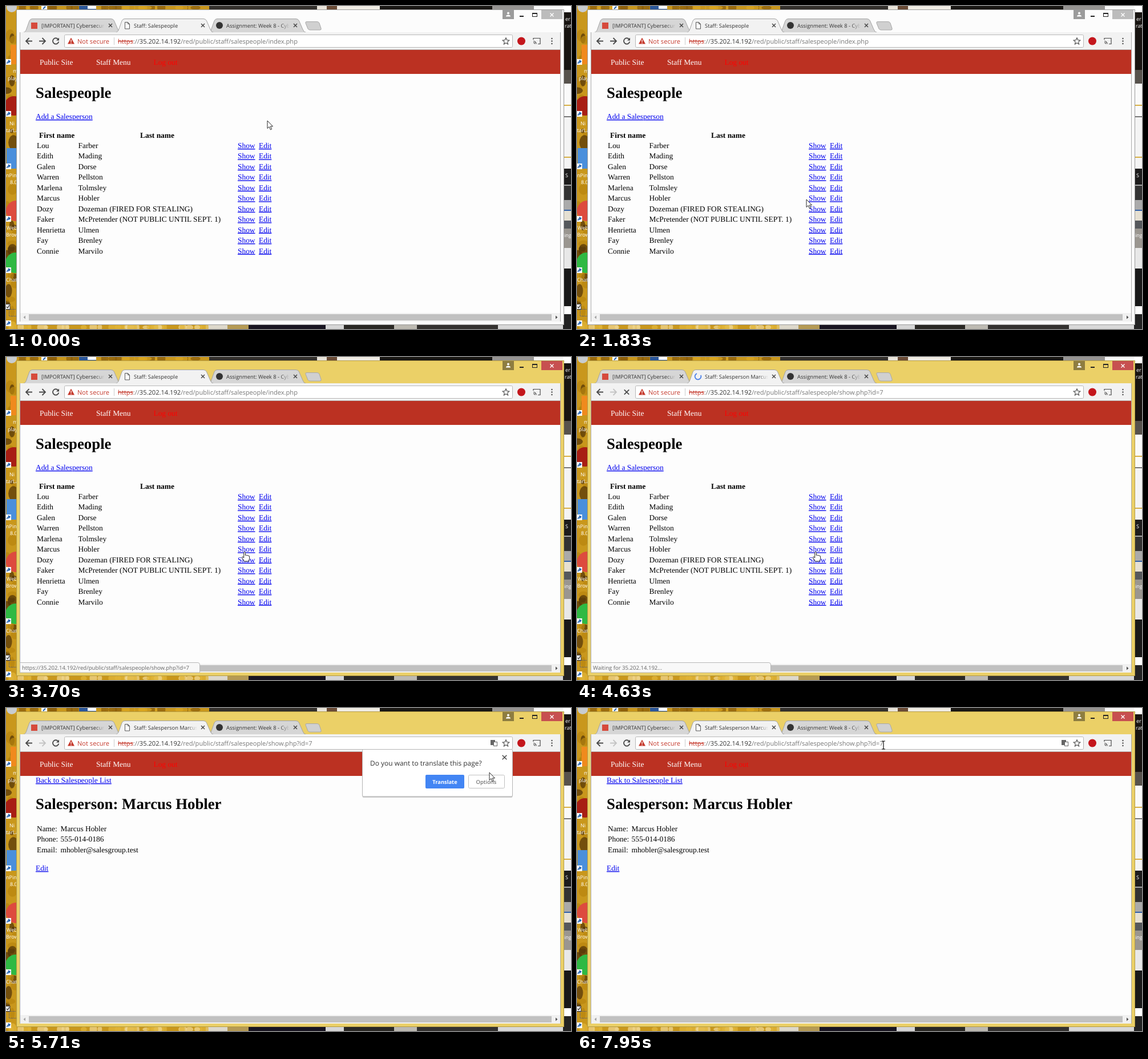
Animation of 990 by 566 pixels, one loop 8000 ms. Source, as an HTML page:

```html
<!DOCTYPE html>
<html lang="en">
<head>
<meta charset="utf-8">
<title>Staff: Salespeople</title>
<style>
html, body { margin: 0; width: 100%; height: 100%; overflow: hidden; background: #c9971c; }
svg {
  display: block; width: 990px; height: 566px; font-family: "Open Sans", sans-serif;
  text-rendering: geometricPrecision;
  --frame: #fcfcfc; --edge: #9a9a9a; --user: #9b9b9b; --close: #bcbcbc;
  background:
    linear-gradient(#fff 0 11px, #181411 0 112px, #57524c 0 136px, #fafafa 0 173px, #d8b045 0 175px,
      #fafafa 0 193px, #777 0 195px, #f4f4f4 0 264px, #d8b045 0 266px, #f4f4f4 0 285px, #1d1c1c 0 313px,
      #a8a8a8 0 315px, #333 0 340px, #aaa 0 357px, #2f5fa8 0 359px, #e6e0d2 0 376px, #55585c 0 390px,
      #9a9690 0 424px, #e8e8e8 0 460px, #191919 0 526px, #fff 0 540px, #222 0) 976px 0 / 14px 566px no-repeat,
    linear-gradient(90deg, #0000 350px, #ddd8cb 0 388px, #b59a55 0 425px, #191521 0 560px, #d6d6d6 0 592px,
      #2a2824 0 680px, #bdbab2 0 720px, #343230 0 862px, #d8d8d8 0) 0 558px / 990px 8px no-repeat,
    linear-gradient(90deg, #0000 356px, #33302c 0 545px, #e9e4da 0 562px, #6a4b36 0 580px, #f0ece4 0 655px,
      #191714 0 852px, #969492 0 925px, #f6f6f6 0) 0 0 / 990px 7px no-repeat,
    #c9971c;
}
svg.on { --frame: #ebd067; --edge: #b39b45; --user: #8e7d40; --close: #c75050; }
.page { font: 13.4px "Liberation Serif", serif; }
.page .h { font-weight: bold; font-size: 26.8px; }
.link { fill: #00e; text-decoration: underline; }
.label { fill: #fff; font-size: 9px; }
.line { fill: none; stroke: #4a4a4a; stroke-width: 1.5; }
</style>
</head>
<body>
<svg id="stage" viewBox="0 0 990 566"></svg>
<script>
const LOOP = 8000;
const people = [
  ['Lou', 'Farber'], ['Edith', 'Mading'], ['Galen', 'Dorse'], ['Warren', 'Pellston'],
  ['Marlena', 'Tolmsley'], ['Marcus', 'Hobler'], ['Dozy', 'Dozeman (FIRED FOR STEALING)'],
  ['Faker', 'McPretender (NOT PUBLIC UNTIL SEPT. 1)'], ['Henrietta', 'Ulmen'],
  ['Fay', 'Brenley'], ['Connie', 'Marvilo']
];
const ROW = 18.45, ROW_TOP = 238;
const host = '35.202.14.192', folder = '/red/public/staff/salespeople/';

// Pointer runs: start, step time, step count, end x, end y
const runs = [
  [140, 139, 8, 426, 275], [1270, 140, 5, 402, 339], [1990, 145, 3, 404, 344],
  [2400, 120, 3, 418, 341], [4750, 200, 3, 447, 126], [5440, 135, 2, 740, 90],
  [5710, 135, 1, 847, 113], [5845, 135, 2, 850, 126], [6250, 130, 5, 873, 86],
  [7050, 130, 1, 470, 37], [7180, 130, 1, 548, 58], [7460, 122, 5, 537, 65]
];

const text = (x, y, str, attrs = '') => `<text x="${x}" y="${y}" ${attrs}>${str}</text>`;
const rect = (x, y, w, h, fill, attrs = '') =>
  `<rect x="${x}" y="${y}" width="${w}" height="${h}" fill="${fill}" ${attrs}/>`;
const disc = (x, y, r, fill, attrs = '') => `<circle cx="${x}" cy="${y}" r="${r}" fill="${fill}" ${attrs}/>`;
const path = (d, attrs = '') => `<path d="${d}" ${attrs}/>`;
const cross = (x, y, r, attrs = 'class="line"') =>
  path(`M${x - r} ${y - r}l${2 * r} ${2 * r}m0 ${-2 * r}l${-2 * r} ${2 * r}`, attrs);

function desktop() {
  let seed = 7;
  const rnd = () => (seed = seed * 16807 % 2147483647) / 2147483647;
  const golds = ['#b8860f', '#e0b437', '#8a5c0a', '#553708', '#efd48c', '#d9a520'];
  let out = '';
  for (let i = 0; i < 110; i++) {
    const [x, y] = [[rnd() * 18, rnd() * 566], [rnd() * 350, 563], [rnd() * 350, 3]][i % 3];
    out += `<ellipse cx="${x}" cy="${y}" rx="${3 + rnd() * 6}" ry="${3 + rnd() * 10}" fill="${golds[i % 6]}" opacity=".75"/>`;
  }
  out += disc(10, 2, 9, '#c8ccd0') + rect(128, 0, 30, 6, '#2b579a') + rect(143, 0, 15, 5, '#fff')
    + rect(8, 68, 16, 34, '#f08a1d') + disc(14, 175, 17, '#a81e14') + rect(1, 249, 20, 36, '#4a8fdc')
    + disc(18, 359, 18, '#dd4b3e') + disc(17, 450, 18, '#2fb943');
  for (const y of [98, 189, 281, 373, 463, 556])
    out += rect(0, y - 5, 9, 10, '#fff') + path(`M2 ${y + 3}q0-4 4-4m-2-2l3 2-3 3`, 'fill="none" stroke="#1d5fb0" stroke-width="1.6"');
  out += rect(62, 0, 10, 6, '#fff') + path('M65 5l4-4', 'stroke="#1d5fb0" stroke-width="2"')
    + rect(-1, 522.5, 8, 9, '#fff', 'stroke="#333"') + path('M1 527l2 2 3-5', 'class="line"')
    + rect(5.5, 531.5, 20, 12, 'none', 'stroke="#1c3fa0" stroke-dasharray="1 1.5"');
  const labels = [[12, 117, 'm'], [3, 130, 'play'], [6, 209, 'Ni'], [0, 221, 'tarLa'], [0, 300, 'nPine'],
    [7, 312, '8.0'], [1, 392, 'Web'], [0, 404, 'Brow'], [0, 483, 'Chat'], [980, 26, 'er'], [979, 38, 'rat'],
    [980, 300, 'S'], [978, 405, 'ing']];
  return out + labels.map(l => text(...l, 'class="label"')).join('');
}

const tab = (x, id, title, fill, icon) => `<g transform="translate(${x})">`
  + path('M0 46.5C4 45.5 5 43 6 40L11 26Q12.5 22.5 16 22.5H154Q158 22.5 159.5 26L166 41Q168 46.5 172 46.5',
    `id="${id}" fill="${fill}" stroke="#a3a3a3"`)
  + icon + text(32, 38, title, `id="${id}Title" font-size="9.35" fill="url(#fade)"`)
  + cross(153, 34, 3) + '</g>';

function browser() {
  return rect(18.5, 6.5, 959, 552, 'var(--frame)', 'stroke="var(--edge)"')
    + rect(870, 7, 20, 16, 'var(--user)') + disc(880, 12.5, 2, '#fff') + path('M876 18.5q0-3 4-3t4 3z', 'fill="#fff"')
    + rect(900, 17, 7, 2, '#222') + rect(922.5, 12.5, 8, 6, 'none', 'stroke="#222"') + rect(922, 12, 9, 2, '#222')
    + rect(938, 7, 37, 16, 'var(--close)') + cross(956.5, 15.5, 3, 'stroke="#fff" stroke-width="1.4"')
    + path('M527 27.5H545Q548 27.5 549 30L552 39Q553 42 550 42H533Q530 42 529 40L525 30Q524 27.5 527 27.5Z', 'fill="#d0d0d0" stroke="#a8a8a8"')
    + tab(354, 'tabC', 'Assignment: Week 8 - Cybersecurity', '#d6d6d6', disc(20, 34, 6, '#333'))
    + tab(30, 'tabA', '[IMPORTANT] Cybersecurity', '#d6d6d6', rect(14, 29, 11, 11, '#d64a3c'))
    + rect(24.5, 46.5, 947, 506, '#fdfdfd', 'stroke="#aaa"') + rect(25, 46, 946, 30, '#f2f2f2')
    + tab(192, 'tabB', '', '#f2f2f2',
      path('M16.5 28.5h5l3 3v8.500h-8zM21.500 28.500v3h3', 'id="doc" fill="#fff" stroke="#555"')
      + disc(20, 34, 5.4, 'none', 'id="spinner" stroke="#4a80e8" stroke-width="1.8" stroke-dasharray="25 9"'))
    + rect(192, 46, 173, 2, '#f2f2f2') + rect(25, 76, 946, 1, '#b6b6b6')
    + path('M46 61.500H35M40.500 56l-5.500 5.500 5.500 5.500', 'class="line" style="stroke-width:1.800"')
    + path('M58 61.500H69M63.500 56l5.500 5.500-5.500 5.500', 'id="forward" class="line" style="stroke-width:1.800"')
    + `<g id="reload">${path('M91.500 58.500A5.200 5.200 0 1 0 92.300 62.500', 'class="line" style="stroke-width:1.800"')}${path('M93 55.500v5h-5z', 'fill="#4a4a4a"')}</g>`
    + cross(87, 61.5, 4.2, 'id="stop" class="line" style="stroke-width:1.800"')
    + rect(102.5, 50.5, 785, 22, '#fff', 'rx="2" stroke="#b8b8b8"')
    + path('M114 55.500l6 11h-12z', 'fill="#c5392c"') + path('M114 59v4m0 1v1.500', 'stroke="#fff" stroke-width="1.300"')
    + text(125, 65.5, 'Not secure', 'font-size="11.1" fill="#c5392c"') + rect(189, 55, 1, 13, '#ccc')
    + text(196, 65.5, `<tspan fill="#c5392c" text-decoration="line-through">https</tspan>://<tspan fill="#333">${host}</tspan>${folder}<tspan id="file"></tspan>`,
      'font-size="11.1" fill="#777"')
    + `<g id="langIcon">${rect(849, 56, 8, 9, '#666')}${rect(854.5, 59.5, 6, 7, '#fff', 'stroke="#666"')}</g>`
    + path('M876 55.800l1.700 3.900 4.100.4-3.100 2.800.9 4.100-3.600-2.200-3.600 2.200.9-4.100-3.100-2.800 4.100-.4z', 'fill="none" stroke="#555" stroke-width="1.200"')
    + disc(903, 61.5, 7, '#c4161c')
    + path('M924 59v-2.500h12v10h-4M924 61.500a5 5 0 0 1 5 5M924 64a2.500 2.500 0 0 1 2.500 2.500', 'class="line" style="stroke-width:1.200"')
    + [57, 61.5, 66].map(y => disc(956.5, y, 1.2, '#4a4a4a')).join('');
}

function pages() {
  const list = people.map(([first, last], i) => {
    const y = 249 + i * ROW;
    return text(54, y, first) + text(126.5, y, last)
      + text(406, y, 'Show', 'class="link"') + text(443, y, 'Edit', 'class="link"');
  }).join('');
  const details = [['Name:', 'Marcus Hobler'], ['Phone:', '555-014-0186'], ['Email:', 'mhobler@salesgroup.test']]
    .map(([key, value], i) => text(54, 216 + i * ROW, key) + text(95.5, 216 + i * ROW, value)).join('');
  return '<g class="page">' + rect(25, 77, 946, 42, '#bb3122')
    + text(59, 103, 'Public Site', 'fill="#fff"') + text(158, 103, 'Staff Menu', 'fill="#fff"') + text(258.5, 103, 'Log out', 'fill="red"')
    + `<g id="list">${text(52, 161, 'Salespeople', 'class="h"')}${text(52, 198, 'Add a Salesperson', 'class="link"')}`
    + text(58, 230.5, 'First name', 'font-weight="bold"') + text(235, 230.5, 'Last name', 'font-weight="bold"') + list + '</g>'
    + `<g id="detail">${text(52, 131, 'Back to Salespeople List', 'class="link"')}${text(52, 176.5, 'Salesperson: Marcus Hobler', 'class="h"')}`
    + details + text(52, 285, 'Edit', 'class="link"') + '</g></g>'
    + rect(25, 538, 946, 15, '#f1f1f1') + rect(40, 540, 916, 11, '#c1c1c1')
    + path('M34 542.500v6l-3.500-3z', 'fill="#a3a3a3"') + path('M963 542.500v6l3.500-3z', 'fill="#505050"')
    + `<g id="status">${path('M24.500 553V535.500H336Q339.500 535.500 339.500 539V553Z', 'fill="#f8f8f8" stroke="#b8b8b8"')}`
    + text(28, 547.5, '', 'id="statusText" font-size="9.55" fill="#666"') + '</g>';
}

const popup = () => '<g id="popup">'
  + rect(624.5, 73.5, 263, 83.5, '#0003', 'rx="2"') + rect(624.5, 72.5, 263, 82.5, '#fff', 'rx="2" stroke="#b5b5b5"')
  + disc(873, 86, 9.5, '#e4e4e4', 'id="closeHover"') + cross(873.5, 86.5, 3.8)
  + text(638, 101, 'Do you want to translate this page?', 'font-size="11.95" fill="#333"')
  + rect(735, 117, 68, 24, '#4285f4', 'rx="2"') + rect(810.5, 117.5, 63, 23, '#fff', 'id="options" rx="2" stroke="#c0c0c0"')
  + text(769, 132.5, 'Translate', 'font-size="9.300" font-weight="bold" fill="#fff" text-anchor="middle"')
  + text(841.5, 132.5, 'Options', 'font-size="9.400" font-weight="600" fill="#757575" text-anchor="middle"') + '</g>';

const pointerShapes = () => '<g id="pointer" stroke="#111" stroke-width=".9" stroke-linejoin="round" fill="#fff">'
  + path('M0 0V13.500L3.200 10.600 5.400 15.800 7.600 14.800 5.400 9.900H9.500Z', 'id="arrow"')
  + path('M-1.300 1.300Q0-.6 1.300 1.300V6.500Q2.600 5.200 3.800 6.800 5.200 5.700 6.400 7.300 8.400 6.600 8.600 9V12.500L7 17H-.5L-4.600 10.600Q-4.600 8.600-2.600 9.400L-1.300 11Z', 'id="hand"')
  + path('M-3-7h2.200l.8.8.8-.8H3M0-6V6M-3 7h2.200l.8-.8.8.8H3', 'id="beam" fill="none" stroke-width="1.200"') + '</g>';

const stage = document.getElementById('stage');
stage.innerHTML = '<defs><linearGradient id="fade" gradientUnits="userSpaceOnUse" x1="126" x2="143">'
  + '<stop stop-color="#333"/><stop offset="1" stop-color="#333" stop-opacity="0"/></linearGradient></defs>'
  + desktop() + browser() + pages() + popup() + pointerShapes();

const el = {};
stage.querySelectorAll('[id]').forEach(node => el[node.id] = node);
const show = (id, on) => el[id].style.display = on ? '' : 'none';
const write = (id, str) => { if (el[id].textContent !== str) el[id].textContent = str; };

function pointerAt(t) {
  let x = 458, y = 201;
  for (const [start, step, count, endX, endY] of runs) {
    if (t < start) break;
    const k = Math.min(count, Math.floor((t - start) / step) + 1) / count;
    x += (endX - x) * k;
    y += (endY - y) * k;
  }
  return [x, y];
}

// Address of the table link under the pointer
function linkAt(x, y) {
  const row = Math.floor((y - ROW_TOP) / ROW);
  const file = x >= 406 && x <= 436.5 ? 'show' : x >= 443 && x <= 466 ? 'edit' : '';
  if (!file || row < 0 || row >= people.length || y - ROW_TOP - row * ROW > 15) return '';
  return `https://${host}${folder}${file}.php?id=${row + 2}`;
}

function draw(t) {
  const [x, y] = pointerAt(t);
  const onList = t < 4750, asked = t >= 3850, loading = asked && t < 4950;
  const link = onList ? linkAt(x, y) : '';
  const status = asked ? (onList ? `Waiting for ${host}...` : '') : link;

  stage.classList.toggle('on', t >= 3700);
  show('list', onList);
  show('detail', !onList);
  show('doc', !loading);
  show('spinner', loading);
  show('stop', loading);
  show('reload', !loading);
  el.spinner.setAttribute('transform', `rotate(${Math.floor((t - 3700) / 155) * 56} 20 34)`);
  el.forward.style.stroke = asked ? '#c4c4c4' : '';
  write('file', asked ? 'show.php?id=7' : 'index.php');
  write('tabBTitle', t < 4480 ? 'Staff: Salespeople' : 'Staff: Salesperson Marcus Hobler');
  show('status', status);
  write('statusText', status);

  show('langIcon', t >= 5150);
  show('popup', t >= 5150 && t < 7050);
  show('closeHover', Math.hypot(x - 873, y - 86) < 8);
  el.options.setAttribute('stroke', x > 810 && y > 118 ? '#999' : '#c0c0c0');
  el.tabC.setAttribute('fill', t >= 7050 && t < 7180 ? '#e4e4e4' : '#d6d6d6');

  const kind = t >= 7180 ? 'beam' : link ? 'hand' : 'arrow';
  for (const id of ['arrow', 'hand', 'beam']) show(id, id === kind);
  el.pointer.setAttribute('transform', `translate(${x} ${y})`);
}

function tick() {
  draw(performance.now() % LOOP);
  requestAnimationFrame(tick);
}
tick();
</script>
</body>
</html>
```
